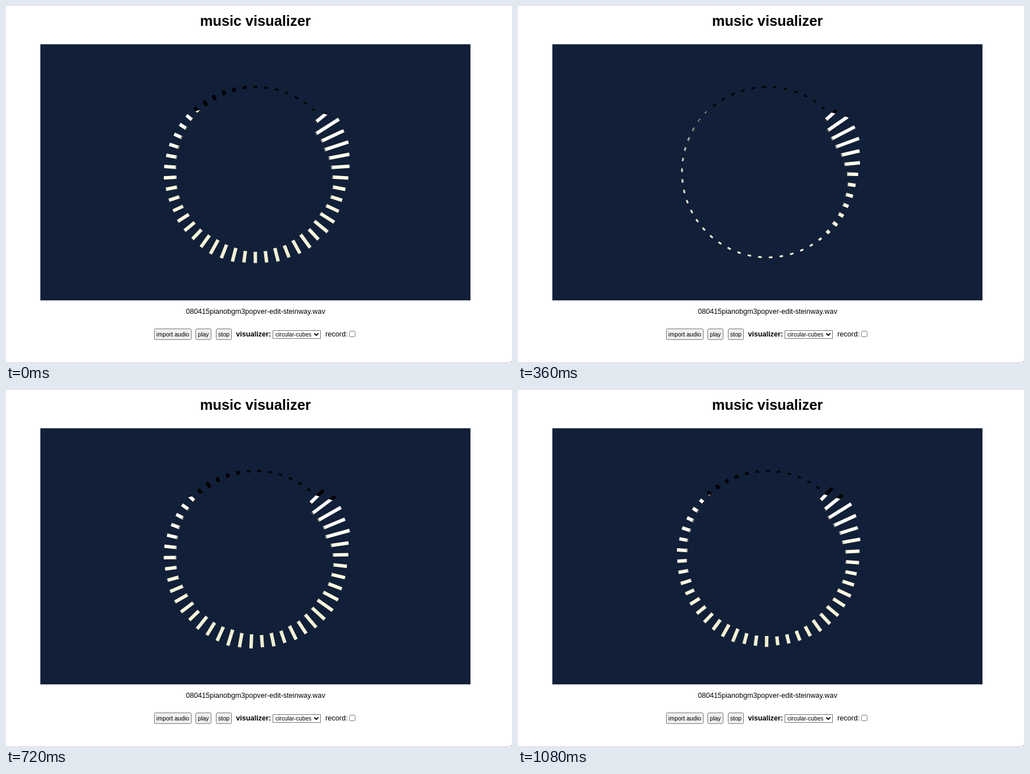
Animation of 892 by 628 pixels, one loop 1200 ms. Source, as an HTML page with a canvas:

```html
<!DOCTYPE html>
<html lang="en">
<head>
<meta charset="utf-8">
<title>music visualizer</title>
<style>
  html, body { margin: 0; width: 100%; height: 100%; overflow: hidden; background: #fff; }
  svg, canvas { position: absolute; left: 0; top: 0; display: block; }
  text { font-family: "Liberation Sans", Arial, sans-serif; font-size: 12.6px; }
  .title { font-size: 25.3px; font-weight: bold; }
  .bold { font-weight: bold; }
  .mid { text-anchor: middle; }
  .small { font-size: 10.5px; }
  .option { font-size: 10.2px; }
  .box { stroke: #767676; fill: #fff; }
  .button { fill: #efefef; }
</style>
</head>
<body>
<svg width="892" height="628" viewBox="0 0 892 628">
  <text class="title mid" x="439.7" y="35">music visualizer</text>
  <rect x="60.5" y="67.5" width="758.3" height="451.8" fill="#111f38"/>
  <text class="mid" x="440" y="543">080415pianobgm3popver-edit-steinway.wav</text>

  <rect class="box button" x="261.5" y="569.5" width="65" height="19" rx="2"/>
  <text class="small mid" x="294" y="582.5">import audio</text>
  <rect class="box button" x="334.5" y="569.5" width="27" height="19" rx="2"/>
  <text class="small mid" x="348" y="582.5">play</text>
  <rect class="box button" x="370.5" y="569.5" width="27" height="19" rx="2"/>
  <text class="small mid" x="384" y="582.5">stop</text>

  <text class="bold" x="405.6" y="583">visualizer:</text>
  <rect class="box" x="470.5" y="572.5" width="84" height="14"/>
  <text class="option" x="475" y="583">circular-cubes</text>
  <path d="M543.5 577.5l3.5 3.5l3.5-3.5" fill="none" stroke="#000" stroke-width="1.8"/>
  <text x="563" y="583">record:</text>
  <rect class="box" x="605.5" y="573.5" width="10" height="10" rx="2"/>
  <rect x="891" y="627" width="1" height="1"/>
</svg>
<canvas id="ring" width="892" height="628"></canvas>

<script>
const ctx = document.getElementById('ring').getContext('2d');
const BARS = 50, FIRST_SLOT = 7, STEP_MS = 120, STEPS = 10;
const CX = 439.5, CY = 293.2, RADIUS = 150.4;
const WIDTH = 6, CAP = 2, MIN = 3;
const RAD = Math.PI / 180, SLOT = 360 / BARS, TURN = .75;

// Spectrum: a bass peak, a rolling middle and a fade to silence.
const spectrum = [[0, 28], [1, 44], [2, 49], [4, 38], [6, 27], [8, 22], [11, 28],
  [18, 19], [22, 27], [29, 20], [32, 20], [37, 11], [44, 3]];
// Loudness by beat: one short pause, then a swell.
const loudness = [[1, 1], [3, 0], [5, .75], [6, 1.07], [9, .87]];

const clamp = (v, lo, hi) => Math.min(hi, Math.max(lo, v));

// Straight lines between key points, flat outside them.
function along(points, x) {
  const n = points.findIndex(p => p[0] >= x);
  if (n < 0) return points[points.length - 1][1];
  if (n === 0) return points[0][1];
  const [x0, y0] = points[n - 1], [x1, y1] = points[n];
  return y0 + (y1 - y0) * (x - x0) / (x1 - x0);
}

// Repeatable noise from -1 to 1.
function noise(step, i) {
  const v = Math.sin(step * 78.233 + i * 12.9898) * 43758.5453;
  return (v - Math.floor(v)) * 2 - 1;
}

function barLength(step, i) {
  const loud = along(loudness, step);
  // Low notes ring on through the pause.
  const sustain = clamp((15 - i) / 13, 0, 1);
  const level = loud + Math.max(0, 1 - loud) * sustain;
  return Math.max(MIN, along(spectrum, i) * level * (1 + .12 * noise(step, i)));
}

function verticalGradient(stops) {
  const g = ctx.createLinearGradient(0, 140, 0, 460);
  for (const [y, color] of stops) g.addColorStop((y - 140) / 320, color);
  return g;
}
const face = verticalGradient([[190, '#fffffc'], [300, '#ffffe5'], [440, '#f1efd4']]);
const cap = verticalGradient([[202, '#000'], [235, '#777'], [300, '#c4c4b6'], [440, '#f0eed4']]);

function slab(angle, inner, outer, fill) {
  const ux = Math.sin(angle), uy = -Math.cos(angle), h = WIDTH / 2;
  ctx.beginPath();
  for (const [r, s] of [[inner, -h], [outer, -h], [outer, h], [inner, h]])
    ctx.lineTo(CX + ux * r - uy * s, CY + uy * r + ux * s);
  ctx.fillStyle = fill;
  ctx.fill();
}

// The light does not reach above this wedge.
function shade() {
  ctx.globalCompositeOperation = 'source-atop';
  ctx.fillStyle = '#000';
  ctx.beginPath();
  ctx.moveTo(CX, 155);
  ctx.lineTo(CX + 200, 213);
  ctx.lineTo(CX + 200, 100);
  ctx.lineTo(CX - 200, 100);
  ctx.lineTo(CX - 200, 213);
  ctx.fill();
  ctx.globalCompositeOperation = 'source-over';
}

function draw(step) {
  ctx.clearRect(0, 0, 892, 628);
  for (let i = 0; i < BARS; i++) {
    const angle = (SLOT * (FIRST_SLOT + i) - TURN * step) * RAD;
    const half = barLength(step, i) / 2;
    const inner = RADIUS - half;
    slab(angle, inner, RADIUS + half, face);
    slab(angle, inner, inner + CAP, cap);
  }
  shade();
}

function tick() {
  draw(Math.floor(performance.now() / STEP_MS) % STEPS);
  requestAnimationFrame(tick);
}
tick();
</script>
</body>
</html>
```
